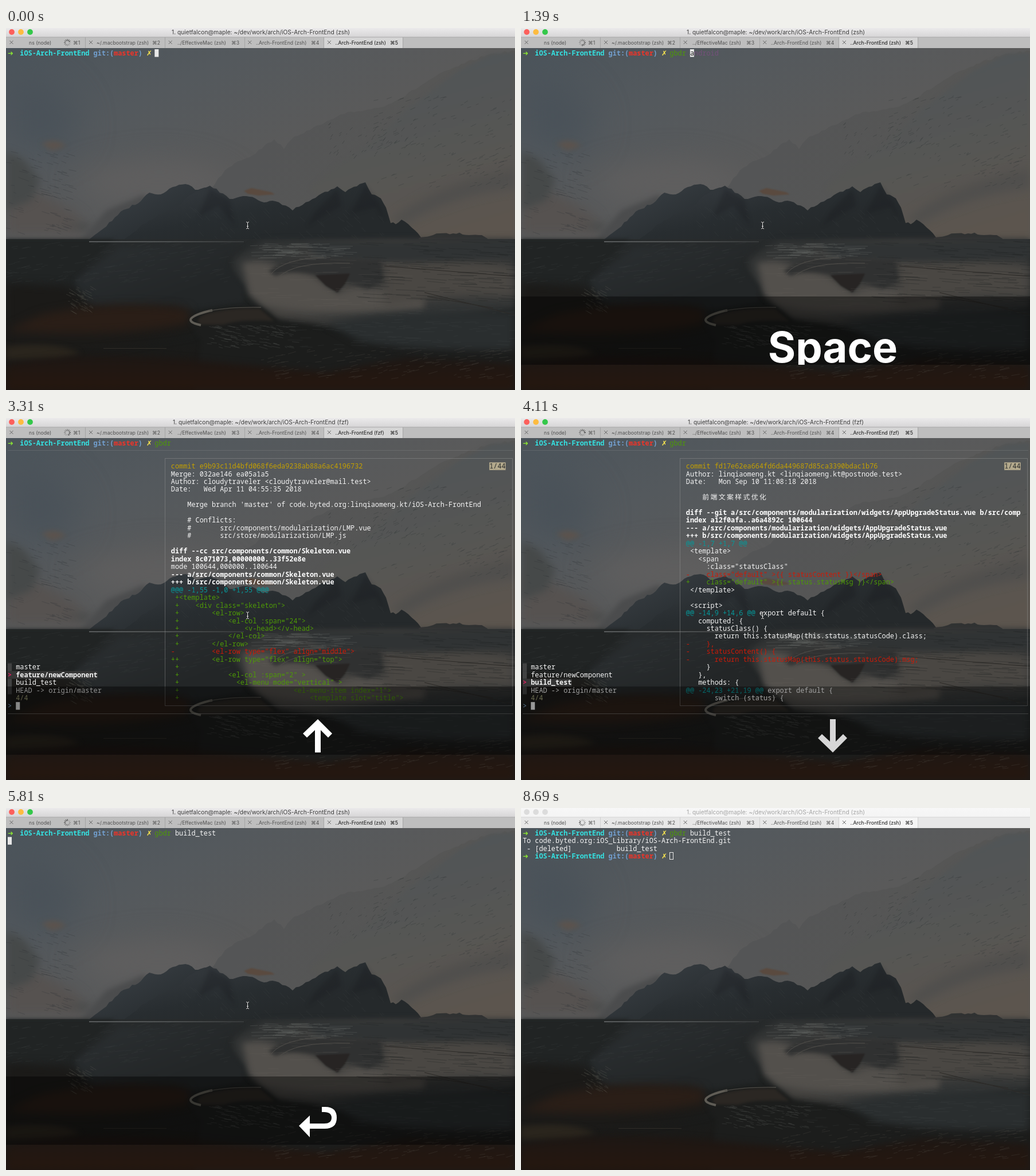
Write an HTML page with a canvas that moves like this. It is 888x631 px and loops after 8.79 s.

```html
<!DOCTYPE html>
<html lang="en">
<head>
<meta charset="utf-8">
<title>Branch removal in a terminal</title>
<style>
html, body { margin: 0; width: 100%; height: 100%; overflow: hidden; background: #1c1d1d; }
canvas { display: block; }
</style>
</head>
<body>
<canvas id="stage" width="888" height="631"></canvas>
<script>
const W = 888, H = 631, LOOP = 8790;
const CELL = 7.12, ROW = 13.475, LEFT = 3, FIRST_ROW = 43.6;
const MONO = '11.87px "Noto Sans Mono", "Noto Sans CJK SC", "DejaVu Sans", monospace';
const UI = 'Inter, "DejaVu Sans", sans-serif';
const C = {
  white: '#f4f4f4', lime: '#8ae234', cyan: '#34e2e2', blue: '#729fcf', bright: '#ef3429', lemon: '#fce94f',
  green: '#4e9a06', red: '#cc1a08', gold: '#c4a000', teal: '#06989a', ghost: '#75507b'
};

const KEYS = [
  [180, 'G'], [400, 'B'], [620, 'D'], [850, 'R'], [1240, 'Space'], [1600, 'tab'],
  [2700, 'up'], [3150, 'up'], [3700, 'down'], [4250, 'return'], [5750, 'return']
];
const OPEN = 2250, PICKED = 4400, RUN = 5800, PUSHED = 7050, DONE = 7600, BLUR = 8300;

const BRANCHES = ['master', 'feature/newComponent', 'build_test', 'HEAD -> origin/master'];
const HEAD_LOG = `commit fd17e62ea664fd6da449687d85ca3390bdac1b76
Author: linqiaomeng.kt <linqiaomeng.kt@postnode.test>
Date:   Mon Sep 10 11:08:18 2018

    前端文案样式优化

diff --git a/src/components/modularization/widgets/AppUpgradeStatus.vue b/src/comp
index a12f0afa..a6a4892c 100644
--- a/src/components/modularization/widgets/AppUpgradeStatus.vue
+++ b/src/components/modularization/widgets/AppUpgradeStatus.vue
@@ -1,7 +1,7 @@
 <template>
   <span
     :class="statusClass"
-    class="default" >{{ statusContent }}</span>
+    class="default" >{{ status.statusMsg }}</span>
 </template>

 <script>
@@ -14,9 +14,6 @@ export default {
   computed: {
     statusClass() {
       return this.statusMap(this.status.statusCode).class;
-    },
-    statusContent() {
-      return this.statusMap(this.status.statusCode).msg;
     }
   },
   methods: {
@@ -24,23 +21,19 @@ export default {
       switch (status) {`.split('\n');
const FEATURE_LOG = `commit e9b93c11d4bfd068f6eda9238ab88a6ac4196732
Merge: 032ae146 ea05a1a5
Author: cloudytraveler <cloudytraveler@mail.test>
Date:   Wed Apr 11 04:55:35 2018

    Merge branch 'master' of code.byted.org:linqiaomeng.kt/iOS-Arch-FrontEnd

    # Conflicts:
    #       src/components/modularization/LMP.vue
    #       src/store/modularization/LMP.js

diff --cc src/components/common/Skeleton.vue
index 8c071073,00000000..33f52e8e
mode 100644,000000..100644
--- a/src/components/common/Skeleton.vue
+++ b/src/components/common/Skeleton.vue
@@@ -1,55 -1,0 +1,55 @@@
 +<template>
 +    <div class="skeleton">
 +        <el-row>
 +            <el-col :span="24">
 +                <v-head></v-head>
 +            </el-col>
 +        </el-row>
-         <el-row type="flex" align="middle">
++        <el-row type="flex" align="top">
 +
 +            <el-col :span="2" >
 +              <el-menu mode="vertical" >
 +                            <el-menu-item index="1">
 +                                <template slot="title">`.split('\n');

const ctx = document.getElementById('stage').getContext('2d');
const backdrop = paintBackdrop();

function paintBackdrop() {
  const canvas = document.createElement('canvas');
  canvas.width = W;
  canvas.height = H;
  const g = canvas.getContext('2d');
  let seed = 7;
  const rnd = () => (seed = seed * 16807 % 2147483647) / 2147483647;
  const blend = (x0, y0, x1, y1, ...colors) => {
    const grad = g.createLinearGradient(x0, y0, x1, y1);
    colors.forEach((c, i) => grad.addColorStop(i / (colors.length - 1), c));
    return grad;
  };
  const shape = (d, fill, blur = 0) => {
    g.filter = blur ? `blur(${blur}px)` : 'none';
    g.fillStyle = fill;
    g.fill(new Path2D(d));
    g.filter = 'none';
  };
  const line = (d, color, width = 1) => {
    g.strokeStyle = color;
    g.lineWidth = width;
    g.stroke(new Path2D(d));
  };
  // A rocky skyline through "x,y" points, closed along the horizon.
  const ridge = (points, fill) => {
    const p = points.split(' ').map(s => s.split(',').map(Number));
    let d = `M${p[0][0]} 370`;
    p.slice(1).forEach(([x, y], i) => {
      const [px, py] = p[i], n = Math.ceil((x - px) / 6);
      d += `L${px} ${py}`;
      for (let k = 1; k < n; k++) d += `L${px + (x - px) * k / n} ${py + (y - py) * k / n + rnd() * 4 - 2.5}`;
    });
    const [ex, ey] = p.at(-1);
    shape(`${d}L${ex} ${ey}V370Z`, fill);
  };
  const streaks = (n, x, y, w, h, len, color, slope = 0) => {
    g.strokeStyle = color;
    g.lineWidth = 1;
    g.beginPath();
    for (let i = 0; i < n; i++) {
      const sx = x + rnd() * w, sy = y + rnd() * h, l = len * (.3 + rnd());
      g.moveTo(sx, sy);
      g.lineTo(sx + l, sy + l * slope + rnd() * 3 - 1.5);
    }
    g.stroke();
  };

  // sky and haze
  shape('M0 0H888V368H0Z', blend(0, 35, 160, 368, '#4b545b', '#54595d', '#5a5a5a'));
  shape('M0 90Q60 60 110 130T60 220L0 200Z', '#4a5259', 30);
  shape('M120 260Q300 200 400 270L360 300H160Z', '#605f5f', 25);
  shape('M62 202Q85 190 106 206L80 214Z', '#5b534d', 4);
  shape('M0 270Q60 280 130 330L140 360H0Z', '#565250', 10);
  shape('M0 215L30 228L60 265L45 300L0 318Z M100 345L150 340L140 352Z', '#464949', 7);
  streaks(90, 0, 215, 110, 145, 14, 'rgba(48,51,53,.3)', .3);
  // far ridges
  ridge('358,280 382,248 405,232 430,222 468,194 485,211 503,189 530,178 590,150 655,138 690,122 750,84 800,62 840,47 888,40',
    blend(500, 150, 760, 368, '#545556', '#565655', '#5a5651'));
  shape('M530 280L580 235L640 198L700 142L790 75L845 46L888 42V368H640Z', blend(700, 90, 780, 360, '#515557', '#565654', '#5c554e'), 3);
  shape('M672 335Q740 275 888 245V280Q780 290 690 345Z', '#504f4d', 8);
  streaks(170, 640, 120, 240, 160, 8, 'rgba(45,50,52,.32)', -.4);
  streaks(60, 560, 160, 170, 70, 4, 'rgba(45,50,52,.4)', -1);
  shape('M415 284L428 279L462 286L469 290L440 292L422 289Z', '#5a4a3f', 1);
  shape('M130 368L175 318L240 291L250 300L210 330L180 368Z', '#4b4c4d', 4);
  // central massif
  ridge('143,370 160,357 175,346 190,330 205,317 230,306 250,287 270,290 285,280 313,272 330,282 356,275',
    blend(200, 280, 240, 370, '#383e43', '#292e31'));
  ridge('205,370 250,335 300,310 332,285 356,275 390,298 425,294 450,304 470,302 500,318 540,296 578,276 592,286 612,276 627,269 638,290 654,297 663,313 671,340 680,342 690,334 708,348 724,365',
    blend(400, 275, 420, 370, '#31363a', '#282d30', '#25292b'));
  ridge('720,366 745,361 780,358 830,361 840,367', '#303232');
  shape('M356 280L335 330L370 310L400 345L390 300Z M578 280L540 320L525 345L585 310Z M627 275L600 325L645 312L660 335L650 303Z', 'rgba(18,22,24,.22)', 3);
  streaks(60, 280, 310, 380, 55, 10, 'rgba(75,80,82,.2)', 1);

  // water and shore
  shape('M0 368H888V631H0Z', blend(0, 368, 0, 631, '#282b2c', '#202323', '#1a1b1a', '#1b1714'));
  shape('M450 372L888 368V490Q780 500 660 532L470 505Q380 430 400 400Z', blend(500, 375, 600, 530, '#333535', '#454340', '#343636'), 6);
  shape('M412 410Q450 400 480 418L530 430L578 462L610 452L665 455L730 470V490Q560 505 450 484L425 465Z', '#53504c', 6);
  shape('M660 412Q780 395 888 415V470Q770 462 660 486Z', '#4a4743', 8);
  shape('M520 372H888V398Q700 414 545 401Z', '#303334', 5);
  shape('M458 424Q480 404 530 401L655 404L658 440L630 455L592 443L580 461L560 450L540 430Q500 420 470 432Z', '#303131', 3);
  shape('M540 431L600 428L592 445L578 461L558 449Z', '#272423', 1);
  streaks(70, 425, 375, 150, 28, 36, 'rgba(120,121,118,.28)');
  streaks(45, 420, 400, 250, 85, 40, 'rgba(120,115,108,.14)');
  streaks(130, 610, 372, 270, 105, 42, 'rgba(28,30,30,.3)', .05);
  shape('M0 368H190L110 440L0 445Z', '#212424', 3);
  shape('M120 440L200 382L410 378L380 408L415 450V478L330 490L140 488Z', blend(200, 380, 240, 490, '#2a2e30', '#232627'), 4);
  shape('M0 445L110 450L155 490L300 488L330 530L0 590Z', '#1b1a18', 8);
  shape('M60 500Q190 472 320 490L318 515Q190 540 0 528Z', '#2a1e17', 8);
  shape('M0 555Q90 545 130 568L90 578H0Z', '#2a251d', 5);
  shape('M340 545L320 512Q350 485 445 487L480 514Q560 520 640 560L888 570V631H330Z', '#1c1d1c', 3);
  shape('M340 517Q325 508 350 498Q390 487 443 489L468 511Q410 507 380 517Z', '#2b2723', 2);
  shape('M560 515Q740 485 888 495V562Q710 565 620 548Z', '#2a2e2f', 7);
  shape('M0 588Q120 560 340 580L560 600L700 575L888 585V631H0Z', blend(0, 570, 0, 631, '#1d1714', '#26170f'), 6);
  streaks(110, 350, 518, 150, 38, 12, 'rgba(95,97,94,.28)', .2);
  streaks(140, 440, 562, 440, 50, 14, 'rgba(92,88,81,.25)', -.2);
  streaks(50, 105, 450, 45, 45, 9, 'rgba(100,99,91,.3)', .6);
  streaks(150, 0, 375, 390, 70, 14, 'rgba(72,76,77,.2)', -.2);
  streaks(120, 480, 490, 400, 70, 22, 'rgba(80,84,84,.18)');
  // bright waterlines
  line('M145 372.5H415', blend(145, 0, 415, 0, '#6c6f70', '#5c5f60', '#3c3f40'), 1.5);
  line('M340 518Q308 511 333 500Q345 495 360 492', '#5f5c55', 4);
  line('M355 493Q390 486 445 487', '#4c4a45', 1.5);
  line('M730 461L888 500M735 468L850 488M660 415L888 433', '#2c2a27');
  line('M460 432Q480 402 555 400M475 435Q500 407 600 410', '#504e4a');
  line('M170 558.5H280', '#302d28');
  return canvas;
}

const xOf = col => LEFT + col * CELL;
const yOf = row => FIRST_ROW + row * ROW;

function box(x, y, w, h, color) {
  ctx.fillStyle = color;
  ctx.fillRect(x, y, w, h);
}

function label(text, x, y, font, color, align = 'left') {
  ctx.font = `${font} ${UI}`;
  ctx.textAlign = align;
  ctx.fillStyle = color;
  ctx.fillText(text, x, y);
}

// Terminal text sits on a cell grid; wide characters take two cells.
function put(row, col, text, color = C.white, weight = 500) {
  ctx.font = `${weight} ${MONO}`;
  ctx.textAlign = 'left';
  ctx.fillStyle = color;
  for (const ch of text) {
    ctx.fillText(ch, xOf(col), yOf(row) + 4);
    col += ch >= '一' && ch <= '鿿' ? 2 : 1;
  }
}

function cursor(row, col, hollow) {
  const x = xOf(col), y = yOf(row) - 6.6;
  if (!hollow) return box(x, y, 7, 13.4, '#e8e8e8');
  ctx.lineWidth = 1;
  ctx.strokeStyle = '#e8e8e8';
  ctx.strokeRect(Math.round(x) + .5, Math.round(y) + .5, 6, 12);
}

function prompt(row) {
  put(row, 0, '➜', C.lime, 700);
  put(row, 3, 'iOS-Arch-FrontEnd', C.cyan, 700);
  put(row, 21, 'git:(', C.blue, 700);
  put(row, 26, 'master', C.bright, 700);
  put(row, 32, ')', C.blue, 700);
  put(row, 34, '✗', C.lemon, 700);
}

function logLine(row, line) {
  const hunk = line.match(/^(@@.*@@)(.*)/);
  if (hunk) {
    put(row, 40, hunk[1], C.teal);
    put(row, 40 + hunk[1].length, hunk[2]);
  } else if (/^(diff|index|---|\+\+\+)/.test(line)) put(row, 40, line, '#fff', 700);
  else put(row, 40, line, /^commit/.test(line) ? C.gold : /^-/.test(line) ? C.red : /^ ?\+/.test(line) ? C.green : C.white);
}

function finder(t) {
  const selected = t < 2750 ? 3 : t < 3200 ? 2 : t < 3750 ? 1 : 2;
  ctx.lineWidth = 1;
  ctx.strokeStyle = 'rgba(150,150,150,.45)';
  ctx.strokeRect(277.5, 70.5, 606, 431);
  box(3, 56, 882, 1, 'rgba(150,150,150,.25)');
  box(3, 515, 882, 1, 'rgba(150,150,150,.5)');
  (selected === 1 ? FEATURE_LOG : HEAD_LOG).forEach((line, i) => logLine(3 + i, line));
  box(xOf(118), yOf(3) - 6.7, 4 * CELL, ROW, '#b3a98c');
  put(3, 118, '1/44', '#292b2b');
  BRANCHES.forEach((name, i) => {
    const on = i === selected, row = 29 + i;
    box(LEFT, yOf(row) - 6.7, on ? (name.length + 2) * CELL : CELL, ROW, on ? '#363636' : '#414242');
    if (on) put(row, 0, '>', '#d7205f', 700);
    put(row, 2, name, C.white, on ? 700 : 500);
  });
  put(33, 2, '4/4', '#a3a37a');
  put(34, 0, '>', '#87afd7');
  cursor(34, 2);
}

function terminal(t) {
  prompt(0);
  const typed = 'gbdr '.slice(0, KEYS.filter(([at]) => at <= t).length);
  const picked = t >= PICKED;
  put(0, 36, typed, C.green);
  if (t < OPEN) {
    const rest = typed && 'gbdr android'.slice(typed.length);
    const col = 36 + typed.length;
    put(0, col, rest, C.ghost);
    cursor(0, col);
    put(0, col, rest.slice(0, 1), '#222');
  } else if (!picked) finder(t);
  if (picked) put(0, 41, 'build_test');
  if (t >= PUSHED) {
    put(1, 0, 'To code.byted.org:iOS_Library/iOS-Arch-FrontEnd.git');
    put(2, 1, '- [deleted]           build_test');
  }
  if (t >= DONE) {
    prompt(3);
    cursor(3, 36, t >= BLUR);
  } else if (t >= PUSHED) cursor(3, 0);
  else if (t >= RUN) cursor(1, 0);
  else if (picked) cursor(0, 51);
}

function chrome(t) {
  const focus = t < BLUR;
  const job = t < 2450 ? 'zsh' : t < 4880 ? 'fzf' : t < 6000 ? 'zsh' : t < DONE ? 'ssh' : 'zsh';
  const bar = ctx.createLinearGradient(0, 0, 0, 16);
  bar.addColorStop(0, focus ? '#ebeaeb' : '#f7f7f7');
  bar.addColorStop(1, focus ? '#d6d5d6' : '#f4f4f4');
  box(0, 0, W, 16, bar);
  box(0, 16, W, 19, focus ? '#bebebe' : '#e7e7e7');
  box(555, 16, 137, 19, focus ? '#d5d5d5' : '#f5f5f5');
  box(0, 15.5, W, 1, focus ? '#aaa' : '#d5d5d5');
  for (const x of [138, 277, 416, 554, 692]) box(x, 16, 1, 19, focus ? '#a4a4a4' : '#d0d0d0');
  ['#fc605c', '#fdbc40', '#34c84a'].forEach((color, i) => {
    ctx.fillStyle = focus ? color : '#dcdcdc';
    ctx.beginPath();
    ctx.arc(10 + 16 * i, 7, 4.9, 0, 7);
    ctx.fill();
  });
  label(`1. quietfalcon@maple: ~/dev/work/arch/iOS-Arch-FrontEnd (${job})`, 444.5, 11, '400 10.2px', focus ? '#3c3c3c' : '#a5a5a5', 'center');
  ctx.lineWidth = 1;
  [[40, 'ns (node)', 117], [158, '~/.macbootstrap (zsh)', 255], [299, '../EffectiveMac (zsh)', 393],
    [436, '..Arch-FrontEnd (zsh)', 532], [574.5, `..Arch-FrontEnd (${job})`, 670]].forEach(([x, name, keyX], i) => {
    const color = i === 4 ? '#111' : '#505050', cross = 9.5 + 138.6 * i;
    label(name, x, 28.5, '400 8.7px', color);
    label('⌘' + (i + 1), keyX, 28.5, '400 8.7px', color);
    ctx.strokeStyle = '#6a6a6a';
    ctx.stroke(new Path2D(`M${cross - 3} 22l6 6m0 -6l-6 6`));
  });
  const step = Math.floor(t / 83);
  for (let i = 0; i < 12; i++) {
    const a = i * Math.PI / 6, c = Math.cos(a), s = Math.sin(a);
    ctx.strokeStyle = `rgba(30,30,30,${.2 + .8 * ((i - step % 12 + 12) % 12) / 11})`;
    ctx.beginPath();
    ctx.moveTo(107 + 3 * c, 25.5 + 3 * s);
    ctx.lineTo(107 + 6 * c, 25.5 + 6 * s);
    ctx.stroke();
  }
}

function keyOverlay(t) {
  const key = KEYS.findLast(([at]) => at <= t);
  const alpha = key ? Math.min(1, (700 - (t - key[0])) / 350) : 0;
  if (alpha <= 0) return;
  const arrow = 'M544 525L569 550L562 557L549 544V583H539V544L525 557L518 550Z';
  const icons = {
    up: arrow,
    down: arrow,
    tab: 'M506 549H557L544 536L551 529L576 554L551 579L544 572L557 559H506ZM578 529H586V579H578Z',
    return: 'M511 554L530 536V550H555Q568 550 568 540T555 530H551V521H557Q577 521 577 540T556 559H530V574Z'
  };
  ctx.save();
  ctx.globalAlpha = alpha;
  box(0, 468, W, 119, 'rgba(0,0,0,.42)');
  ctx.beginPath();
  ctx.rect(0, 468, W, 119);
  ctx.clip();
  if (icons[key[1]]) {
    if (key[1] === 'down') ctx.transform(1, 0, 0, -1, 0, 1108);
    ctx.fillStyle = '#fff';
    ctx.fill(new Path2D(icons[key[1]]));
  } else label(key[1], 544, 583, '700 74px', '#fff', 'center');
  ctx.restore();
}

function pointer(t) {
  if (t >= BLUR) return;
  const p = Math.min(1, Math.max(0, (t - 6800) / 500)), e = p * p * (3 - 2 * p);
  const beam = new Path2D('M-2.5 -6Q0 -6 0 -4Q0 -6 2.5 -6M0 -4V4M-2.5 6Q0 6 0 4Q0 6 2.5 6M-1.5 1.5H1.5');
  ctx.save();
  ctx.translate(421.5 + 361.5 * e, 344 + 273.5 * e);
  for (const [width, color] of [[2.4, 'rgba(20,20,20,.6)'], [1, '#e6e6e6']]) {
    ctx.lineWidth = width;
    ctx.strokeStyle = color;
    ctx.stroke(beam);
  }
  ctx.restore();
}

function frame(now) {
  const t = now % LOOP;
  ctx.drawImage(backdrop, 0, 0);
  terminal(t);
  chrome(t);
  keyOverlay(t);
  pointer(t);
  requestAnimationFrame(frame);
}
requestAnimationFrame(frame);
</script>
</body>
</html>
```
